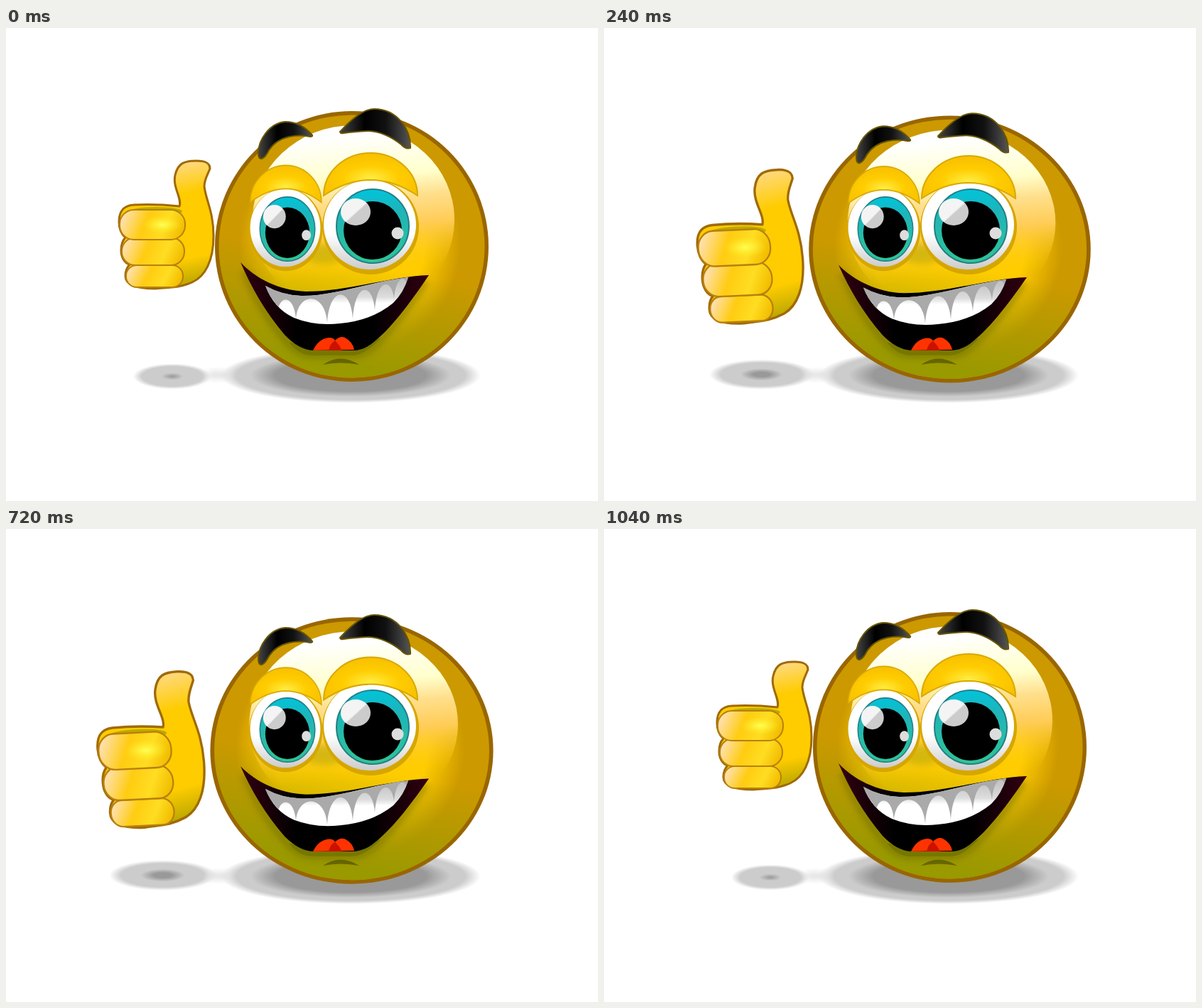
An HTML page that plays this animation: 833x666 px, repeating every 1120 ms.

```html
<!DOCTYPE html>
<html lang="en">
<head>
<meta charset="utf-8">
<title>Thumbs up</title>
<style>
  html, body { margin: 0; width: 100%; height: 100%; overflow: hidden; background: #fff; }
  svg { display: block; width: 833px; height: 666px; }
</style>
</head>
<body>
<svg viewBox="0 0 833 666">
  <defs>
    <radialGradient id="shade">
      <stop offset=".58" stop-color="#999"/><stop offset=".77" stop-color="#ccc"/>
      <stop offset=".88" stop-color="#ccc"/><stop offset="1" stop-color="#fff"/>
    </radialGradient>
    <radialGradient id="smallShade">
      <stop id="core" stop-color="#999"/><stop id="mid" stop-color="#ccc"/>
      <stop offset=".78" stop-color="#ccc"/><stop offset="1" stop-color="#fff"/>
    </radialGradient>
    <radialGradient id="skin" gradientUnits="userSpaceOnUse" cx="484" cy="305" r="190">
      <stop offset=".55" stop-color="#fc0"/><stop offset=".82" stop-color="#c90"/>
    </radialGradient>
    <linearGradient id="olive" gradientUnits="userSpaceOnUse" x1="520" y1="335" x2="490" y2="480">
      <stop offset="0" stop-color="#990" stop-opacity="0"/><stop offset="1" stop-color="#990"/>
    </linearGradient>
    <linearGradient id="gloss" x1=".45" y1="0" x2=".55" y2="1">
      <stop offset=".06" stop-color="#fff"/><stop offset=".28" stop-color="#ffc"/>
      <stop offset=".4" stop-color="#ffdf8c"/><stop offset=".55" stop-color="#fc5"/>
      <stop offset=".8" stop-color="#fc0" stop-opacity="0"/>
    </linearGradient>
    <linearGradient id="white" x2="0" y2="1">
      <stop offset=".6" stop-color="#fff"/><stop offset="1" stop-color="#ccc"/>
    </linearGradient>
    <linearGradient id="iris" x2="0" y2="1">
      <stop offset="0" stop-color="#00c4dc"/><stop offset=".3" stop-color="#1fb4b8"/>
      <stop offset="1" stop-color="#2fc596"/>
    </linearGradient>
    <linearGradient id="glint" x2="1" y2="1">
      <stop offset=".5" stop-color="#f4f4f4"/><stop offset=".54" stop-color="#ccc"/>
    </linearGradient>
    <radialGradient id="lidFill" cy=".6" r=".6">
      <stop offset="0" stop-color="#fe4"/><stop offset=".5" stop-color="#fc0"/>
      <stop offset="1" stop-color="#f7c000"/>
    </radialGradient>
    <linearGradient id="brow">
      <stop offset="0" stop-color="#444"/><stop offset=".35" stop-color="#000"/>
      <stop offset=".65" stop-color="#111"/><stop offset="1" stop-color="#555"/>
    </linearGradient>
    <linearGradient id="mouth">
      <stop offset="0" stop-color="#301"/><stop offset=".3" stop-color="#000"/>
      <stop offset=".7" stop-color="#000"/><stop offset="1" stop-color="#301"/>
    </linearGradient>
    <linearGradient id="teeth" x2="0" y2="1">
      <stop offset=".1" stop-color="#c4c4c4"/><stop offset=".42" stop-color="#ddd"/>
      <stop offset=".55" stop-color="#fff"/>
    </linearGradient>
    <linearGradient id="palm" x1=".35" x2=".5" y2="1">
      <stop offset="0" stop-color="#ffdca0"/><stop offset=".3" stop-color="#fc0"/>
      <stop offset=".8" stop-color="#fc0"/><stop offset="1" stop-color="#bba800"/>
    </linearGradient>
    <linearGradient id="finger" y1=".3" x2="1" y2=".5">
      <stop offset="0" stop-color="#ffe2bd"/><stop offset=".4" stop-color="#fc1"/>
      <stop offset=".72" stop-color="#fd2"/><stop offset="1" stop-color="#f2bd00"/>
    </linearGradient>
    <radialGradient id="knuckle" cx=".65" r=".3">
      <stop offset="0" stop-color="#ff5"/><stop offset="1" stop-color="#fe2" stop-opacity="0"/>
    </radialGradient>
    <filter id="soft" x="-30%" y="-60%" width="160%" height="220%"><feGaussianBlur stdDeviation="5"/></filter>
    <clipPath id="toothClip"><use href="#toothShape"/></clipPath>

    <!-- Eye and lid, centred on the iris -->
    <g id="eye">
      <ellipse cx="-3" cy="1" rx="68" ry="67" fill="#d6a600"/>
      <ellipse cx="-4" cy="-2" rx="65" ry="63" fill="url(#white)"/>
      <ellipse rx="51" ry="52" fill="url(#iris)" stroke="#247f84" stroke-width="2"/>
      <ellipse cy="6" rx="41" ry="41"/>
      <ellipse cx="-24" cy="-20" rx="21" ry="19" fill="url(#glint)"/>
      <circle cx="35" cy="10" r="8.500" fill="#ddd"/>
    </g>
    <path id="lid" d="M-69-43Q-3-87 63-43A66 60 0 0 0-69-43Z" fill="url(#lidFill)" stroke="#d9a800" stroke-width="2"/>
  </defs>

  <ellipse id="handShade" fill="url(#smallShade)"/>
  <ellipse cx="485" cy="489" rx="183" ry="39" fill="url(#shade)"/>
  <rect x="284" y="484" width="30" height="9" fill="#ddd" filter="url(#soft)"/>

  <g id="head">
    <ellipse rx="192.500" ry="190.500" cx="486.500" cy="307.500" fill="#960"/>
    <ellipse rx="187" ry="185" cx="486.500" cy="307.500" fill="url(#skin)"/>
    <ellipse rx="187" ry="185" cx="486.500" cy="307.500" fill="url(#olive)"/>
    <ellipse rx="142" ry="133" cx="489" cy="270" fill="url(#gloss)"/>
  </g>
  <ellipse cx="448" cy="318" rx="30" ry="14" fill="#990" opacity=".4" filter="url(#soft)"/>
  <path d="M446 474Q470 457 497 474Q470 469 446 474" fill="#660"/>

  <g id="grin">
    <path d="M336 342C350 380 375 420 400 446Q415 460 432 460H488Q506 460 524 442C550 415 575 380 590 356"
      fill="none" stroke="#660" stroke-width="10" opacity=".5" filter="url(#soft)"/>
    <path d="M398 442Q412 461 432 461H488Q506 460 528 436L486 450H434Z" fill="#770"/>
    <path d="M330 330C350 352 385 370 422 371C480 371 540 350 595 348C575 378 545 420 520 440Q505 454 488 454H432Q412 453 392 432C365 400 345 365 330 330Z" fill="url(#mouth)"/>
    <path d="M432 454Q440 437 455 436Q461 436 463 440Q470 433 477 436Q488 442 490 453Z" fill="#f30"/>
    <path d="M454 454Q456 444 463 440Q469 446 473 454Z" fill="#c10"/>
    <path id="toothShape" d="M365 363Q388 376 415 377C460 378 510 358 566 351Q560 372 545 387Q515 412 470 416Q435 420 405 408Q377 395 365 363Z" fill="url(#teeth)"/>
    <path id="gums" fill="#aaa" clip-path="url(#toothClip)"/>
  </g>

  <use href="#eye" transform="translate(396 283) scale(.76 .87)"/>
  <use href="#eye" transform="translate(516 279)"/>
  <use href="#lid" id="lidLeft"/>
  <use href="#lid" id="lidRight"/>

  <g id="brows" fill="url(#brow)" stroke="#650" stroke-width="2" stroke-linejoin="round">
    <path d="M470 146C480 135 500 114 518 114C552 114 570 145 569 169Q562 171 556 164Q533 146 510 145Q490 146 475 148Q470 149 470 146Z"/>
    <path d="M431 151C420 138 408 132 393 132C370 134 355 158 355 176Q355 185 360 184Q365 182 370 172Q380 157 399 153Q413 150 428 153Q432 153 431 151Z"/>
  </g>

  <g id="hand" stroke-linejoin="round">
    <path d="M244 251C248 240 234 224 238 207S251 187 268 187S287 193 287 198C284 206 279 213 279 223C281 242 292 258 292 293S280 350 262 358S230 365 210 367C180 367 168 360 168 349Q168 339 174 333C166 331 162 322 162 313S165 298 168 295C162 290 159 282 159 273C159 258 165 250 180 249C200 248 225 249 244 251Z"
      fill="url(#palm)" stroke="#a06a08" stroke-width="3"/>
    <ellipse cx="211" cy="258" rx="37" ry="6" fill="#990" opacity=".65"/>
    <g fill="url(#finger)" stroke="#b8800c" stroke-width="2">
      <rect x="169" y="334" width="80" height="31" rx="15"/>
      <rect x="163" y="295" width="88" height="39" rx="19"/>
      <rect x="160" y="256" width="92" height="42" rx="20"/>
    </g>
    <rect x="160" y="256" width="92" height="42" rx="20" fill="url(#knuckle)"/>
  </g>
</svg>
<script>
const $ = id => document.getElementById(id);
const set = (id, attrs) => { for (const k in attrs) $(id).setAttribute(k, attrs[k]); };
const move = (id, transform) => set(id, { transform });
const lerp = (a, b, t) => a + (b - a) * t;

// Gum arches hang between the gaps of the teeth
const archY = x => 378 - (x - 366) * .17;
const tipY = x => 415 - (x - 448) ** 2 * .0035;
let gumLine = 'M360 350L366 378', last = 366;
for (const x of [382, 408, 452, 488, 519, 546, 566]) {
  gumLine += `C${last + 3} ${archY(last)} ${x - 3} ${archY(last)} ${x} ${tipY(x)}`;
  last = x;
}
set('gums', { d: gumLine + 'L566 345Z' });

// Affine map of the raised hand to the lowered, nearer one
const raised = [1, 0, 0, 1, 0, 0], lowered = [1.13, -.065, .12, 1.24, -89.3, -11];

function pose(step) {
  const u = step < 6 ? 1 - step / 6 : (step - 6) / 7;
  const squash = 1 - u;
  const swing = (1 - u * u) / .975;

  move('head', `translate(486.5 ${307.5 + 7.9 * squash}) scale(${1 + .06 * squash} ${1 - .026 * squash}) translate(-486.5 -307.5)`);
  move('grin', `translate(0 454) scale(1 ${1 - .0565 * squash}) translate(0 -454)`);
  move('brows', `translate(0 ${12.3 * squash})`);
  move('lidLeft', `translate(396 ${283 + 3 * squash}) scale(.76 .87)`);
  move('lidRight', `translate(516 ${279 + 8 * squash})`);
  move('hand', `matrix(${raised.map((v, i) => lerp(v, lowered[i], swing))})`);

  set('handShade', {
    cx: lerp(234, 218, swing), cy: lerp(490.5, 487, swing),
    rx: lerp(55, 79, swing), ry: lerp(18, 22, swing)
  });
  set('core', { offset: lerp(0, .2, swing) });
  set('mid', { offset: lerp(.28, .44, swing) });
}

function frame() {
  pose(Math.floor(performance.now() / 80) % 14);
  requestAnimationFrame(frame);
}
frame();
</script>
</body>
</html>
```
